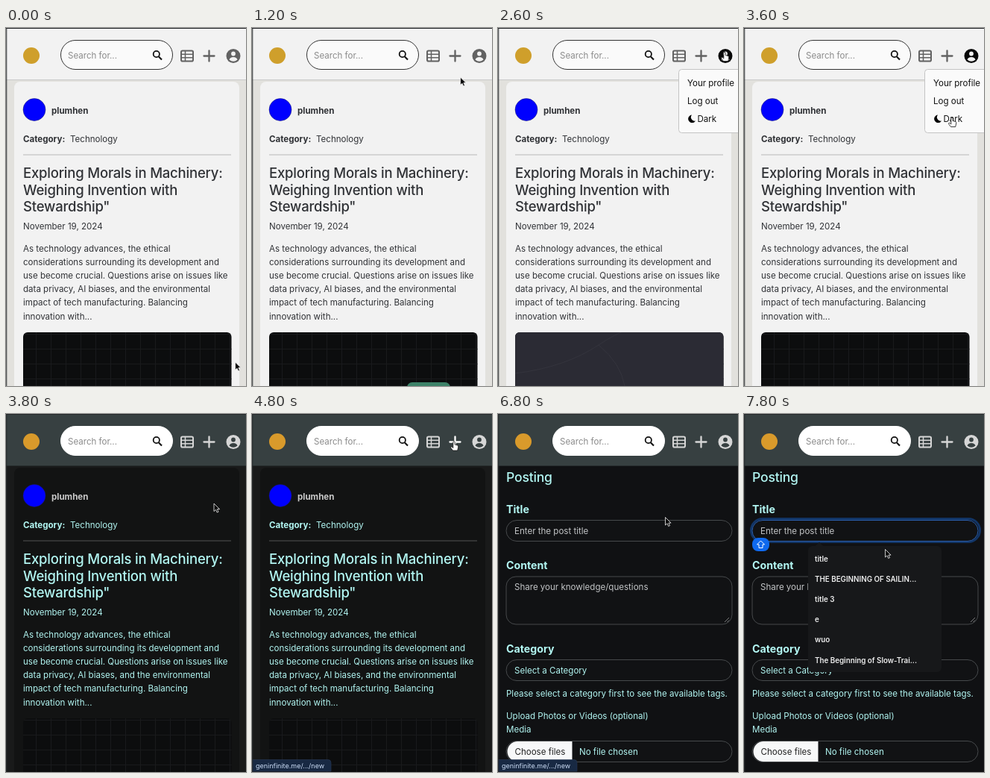
Write an HTML page that moves like this. It is 322 px wide and 480 px high and loops after 8000 ms.

```html
<!DOCTYPE html>
<html lang="en">
<head>
<meta charset="utf-8">
<title>Blog theme and posting demo</title>
<style>
html, body { margin: 0; width: 100%; height: 100%; overflow: hidden; background: #111; }
svg {
  display: block; width: 100%; height: 100%;
  font: 11.55px Inter, "Open Sans", sans-serif;
  --page: #e2e1dd; --header: #f2f2f2; --line: #c9c9c9; --card: #f2f2f2;
  --text: #303236; --user: #303236; --icon: #626262; --pill: #fafafa; --edge: #333; --gold: #cf9f2b;
}
svg.dark {
  --page: #191a1a; --header: #374041; --line: #252b2b; --card: #121313;
  --text: #b2f6f2; --user: #c9c9c9; --icon: #d6d6d6; --pill: #fff; --edge: #fff; --gold: #d99a2b;
}
text { fill: var(--text); white-space: pre; }
.bold { font-weight: 700; }
.heading { font-size: 18.5px; font-weight: 500; letter-spacing: -.2px; }
.label { font-size: 14.2px; font-weight: 700; }
.hint { fill: #c3c5c7; }
.field { fill: #111214; stroke: #46494b; }
.icon { stroke: var(--icon); fill: none; }
#menu text { fill: #111; }
#suggestions text { fill: #eee; font-size: 9.8px; font-weight: 600; }
#status text { fill: #cbdcf5; font-size: 9px; }
</style>
</head>
<body>
<svg id="stage" viewBox="0 0 322 480">
  <defs>
    <pattern id="grid" width="20" height="20" patternUnits="userSpaceOnUse">
      <path d="M.5 0V20M0 10.5H20" stroke="#191a1c" fill="none"/>
    </pattern>
    <clipPath id="mediaClip"><rect x="23" y="408" width="279.5" height="90" rx="6"/></clipPath>
  </defs>
  <rect width="322" height="480" fill="var(--page)"/>

  <g id="article">
    <rect x="11" y="72" width="302" height="430" rx="8" fill="var(--card)"/>
    <circle cx="38" cy="109.5" r="15" fill="#00f" stroke="#1a1a66" stroke-width=".5"/>
    <text class="bold" x="61" y="114.5" style="fill:var(--user)">plumhen</text>
    <text class="bold" x="23" y="153">Category:</text>
    <text x="86" y="153">Technology</text>
    <path d="M23 170H302" stroke="#888" stroke-opacity=".55"/>
    <g class="heading">
      <text x="23" y="201">Exploring Morals in Machinery:</text>
      <text x="23" y="223.5">Weighing Invention with</text>
      <text x="23" y="246">Stewardship"</text>
    </g>
    <text x="23" y="270">November 19, 2024</text>
    <g id="paragraph"></g>
    <g clip-path="url(#mediaClip)">
      <rect x="23" y="408" width="280" height="72" fill="#0c0d0e"/>
      <rect x="23" y="408" width="280" height="72" fill="url(#grid)"/>
      <rect id="bubble" x="208" y="475" width="58" height="20" rx="7" fill="#3d8268"/>
      <g id="slate">
        <rect x="23" y="408" width="280" height="72" fill="#2b2b34"/>
        <path d="M23 463Q90 455 135 425T190 408M135 425Q165 450 170 480" stroke="#34343d" fill="none"/>
      </g>
    </g>
  </g>

  <g id="form">
    <rect y="69" width="322" height="411" fill="#101113"/>
    <text class="heading" x="11" y="90.5" style="font-size:17.6px">Posting</text>
    <text class="label" x="11" y="132.5">Title</text>
    <rect id="focusRing" x="9.5" y="140.5" width="307" height="31" rx="15.5" fill="none" stroke="#123566" stroke-width="3"/>
    <rect id="titleField" class="field" x="11" y="142.5" width="303" height="28" rx="14"/>
    <text class="hint" x="22" y="160.5">Enter the post title</text>
    <text class="label" x="11" y="208">Content</text>
    <rect class="field" x="11" y="218" width="303" height="64" rx="13"/>
    <path d="M304 279L310 273M307.500 279L310 276.500" stroke="#999" stroke-width=".8"/>
    <text class="hint" x="22" y="236">Share your knowledge/questions</text>
    <text class="label" x="11" y="319.5">Category</text>
    <rect class="field" x="11" y="329.500" width="303" height="28" rx="14"/>
    <text x="22" y="347.500">Select a Category</text>
    <text x="11" y="379">Please select a category first to see the available tags.</text>
    <text x="11" y="409">Upload Photos or Videos (optional)</text>
    <text x="11" y="427">Media</text>
    <rect class="field" x="11" y="438.500" width="303" height="28" rx="14"/>
    <path d="M99.500 439V466H26A13.500 13.500 0 0 1 26 439Z" fill="#f7f8f9"/>
    <text x="22.500" y="456.500" style="fill:#222">Choose files</text>
    <text x="109" y="456.500">No file chosen</text>
    <g id="suggestions">
      <path d="M95 177.500L101 172L107 177.500Z" fill="#17181a"/>
      <rect x="86" y="177" width="179" height="169" rx="6" fill="#17181a"/>
      <rect x="11" y="166" width="23" height="18" rx="8" fill="#0f69ee"/>
      <path d="M22.500 170L27.500 175H25V179.500H20V175H17.500Z" fill="none" stroke="#fff"/>
    </g>
  </g>

  <g id="header">
    <rect width="322" height="69" fill="var(--header)"/>
    <path d="M0 69.500H322" stroke="var(--line)"/>
    <circle cx="34" cy="37" r="11" fill="var(--gold)"/>
    <rect x="73.500" y="16.500" width="150" height="39" rx="19.500" fill="var(--pill)" stroke="var(--edge)"/>
    <text x="83" y="40.500" style="fill:#8b8b8b">Search for...</text>
    <path d="M205 38.500L209 42.500" stroke="#111" stroke-width="2.200"/>
    <circle cx="201.800" cy="35" r="4.100" fill="none" stroke="#111" stroke-width="1.800"/>
    <rect class="icon" x="235" y="30.500" width="16" height="14" rx="1.800" stroke-width="2"/>
    <path class="icon" d="M240.500 31V44M235 35.200H251M235 39.800H251" stroke-width="1.500"/>
    <path id="plus" class="icon" d="M265.500 37.500H279.500M272.500 30.500V44.500" stroke-width="2.300" stroke-linecap="round"/>
    <circle id="account" cx="305" cy="37.500" r="9.500" fill="var(--icon)"/>
    <circle cx="305" cy="34.500" r="2.900" fill="var(--header)"/>
    <path d="M299.500 42.500Q300.500 39 305 39T310.500 42.500Q305 47 299.500 42.500Z" fill="var(--header)"/>
  </g>

  <g id="menu">
    <rect x="242.500" y="55.500" width="85" height="85" rx="4" fill="#fafafa" stroke="#c4c4c4"/>
    <text x="254" y="78">Your profile</text>
    <text x="254" y="102">Log out</text>
    <path d="M260 116.500A5.300 5.300 0 1 0 265 124.500A5 5 0 0 1 260 116.500Z"/>
    <text x="267.500" y="126">Dark</text>
  </g>

  <g id="status">
    <path d="M0 463.500H102Q106 463.500 106 467.500V479H0Z" fill="#182943" stroke="#2a3c58" stroke-width=".6"/>
    <text x="5" y="474.500">geninfinite.me/.../new</text>
  </g>

  <path d="M.75 0V480M0 .500H322" stroke="#25282b" fill="none"/>
  <g id="cursor" stroke-linejoin="round">
    <path id="arrow" d="M0 0V10.500L2.500 8.300L4.200 12L6 11.200L4.400 7.600H7.600Z" fill="#080808" stroke="#f5f5f5" stroke-width=".8"/>
    <path id="hand" d="M-1.200 7V1Q0 -1 1.200 1V4.500L5 5.500Q6 6 5.700 8L4.700 12.500H-1.500L-4.500 8.500Q-4.500 6.500 -2.800 7.500L-1.200 9Z" fill="#fff" stroke="#111" stroke-width=".8"/>
  </g>
</svg>
<script>
const LOOP = 8000, STEP = 200, MEDIA_LOOP = 4400;
const el = id => document.getElementById(id);
const show = (id, visible) => { el(id).style.display = visible ? "" : "none"; };

function addLines(id, lines, x, y, spacing) {
  lines.forEach((line, i) => {
    const text = document.createElementNS(el("stage").namespaceURI, "text");
    text.setAttribute("x", x);
    text.setAttribute("y", y + i * spacing);
    text.textContent = line;
    el(id).append(text);
  });
}

addLines("paragraph", [
  "As technology advances, the ethical",
  "considerations surrounding its development and",
  "use become crucial. Questions arise on issues like",
  "data privacy, AI biases, and the environmental",
  "impact of tech manufacturing. Balancing",
  "innovation with..."
], 23, 300, 18.1);

addLines("suggestions", [
  "title", "THE BEGINNING OF SAILIN...", "title 3", "e", "wuo", "The Beginning of Slow-Trai..."
], 95, 198, 27.1);

// Pointer stops: time, x, y
const stops = [
  [0, 307.5, 448], [400, 307.5, 448], [1200, 279.5, 66], [1600, 304, 32], [2800, 304, 32],
  [3400, 279, 120], [4000, 279, 120], [4800, 271, 36.5], [6000, 271, 36.5],
  [6800, 224.5, 138.5], [7200, 200, 156], [7400, 200, 156], [7800, 189.5, 181.5]
];

function pointerAt(t) {
  const next = stops.findIndex(stop => stop[0] > t);
  if (next < 0) return stops[stops.length - 1].slice(1);
  const [t0, x0, y0] = stops[next - 1], [t1, x1, y1] = stops[next];
  const p = (t - t0) / (t1 - t0), ease = p * p * (3 - 2 * p);
  return [x0 + (x1 - x0) * ease, y0 + (y1 - y0) * ease];
}

function render(now) {
  const t = Math.floor(now % LOOP / STEP) * STEP;
  const within = (from, to) => t >= from && t < to;
  const media = t % MEDIA_LOOP;
  const posting = t >= 6000, focused = t >= 7400;
  const overAccount = within(1600, 3800), overPlus = within(4800, 6200);

  el("stage").classList.toggle("dark", t >= 3800);
  show("article", !posting);
  show("form", posting);
  show("menu", within(2000, 3800));
  show("status", within(4800, 7000));
  show("bubble", media >= 1000 && media < 2000);
  show("slate", media >= 2000 && media < 3400);
  show("focusRing", focused);
  show("suggestions", focused);
  el("titleField").style.stroke = focused ? "#2a5ca8" : "";
  el("account").style.fill = overAccount ? "#080808" : "";
  el("plus").style.stroke = overPlus ? "#fff" : "";

  const hand = overAccount || overPlus;
  show("hand", hand);
  show("arrow", !hand);
  el("cursor").setAttribute("transform", `translate(${pointerAt(t)})`);
}

const start = performance.now();
function tick() {
  render(performance.now() - start);
  requestAnimationFrame(tick);
}
tick();
</script>
</body>
</html>
```
